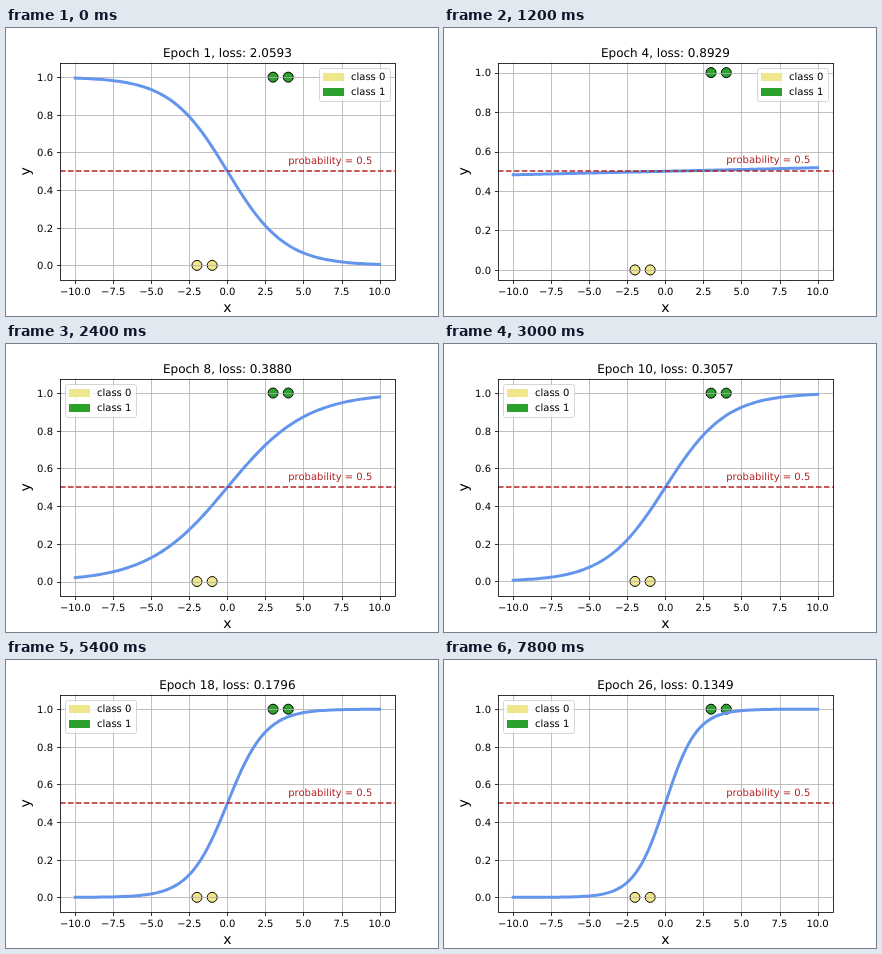
Animation, 432 px wide and 288 px high, one loop 8000 ms. Source, as an HTML page:

```html
<!DOCTYPE html>
<html lang="en">
<head>
<meta charset="utf-8">
<title>Logistic regression training</title>
<style>
  html, body { margin: 0; width: 100%; height: 100%; overflow: hidden; background: #fff; }
  svg { display: block; width: 432px; height: 288px; }
  text { font-family: "DejaVu Sans", Verdana, sans-serif; font-size: 10px; text-rendering: geometricPrecision; }
</style>
</head>
<body>
<svg id="stage" viewBox="0 0 432 288"></svg>
<script>
const LOOP = 8000, STEP = 300, RATE = 0.1, START_WEIGHT = -0.75;
const BOX = { left: 54, right: 388.8, top: 34.56, bottom: 252 };
const WIDTH = BOX.right - BOX.left, HEIGHT = BOX.bottom - BOX.top;
const RADIUS = 5, SAMPLES = 100;
const KHAKI = '#f0e68c', GREEN = '#2ca02c', RED = '#b22222';
const POINTS = [[-2, 0], [-1, 0], [3, 1], [4, 1]];

const svg = document.getElementById('stage');

function add(parent, tag, attrs = {}, content = '') {
  const el = document.createElementNS('http://www.w3.org/2000/svg', tag);
  set(el, attrs);
  el.textContent = content;
  parent.appendChild(el);
  return el;
}
function set(el, attrs) {
  for (const key in attrs) el.setAttribute(key, attrs[key]);
}

const snap = v => Math.floor(v + 0.5) + 0.5;
const sigmoid = z => 1 / (1 + Math.exp(-z));
const xPos = x => BOX.left + WIDTH * (x + 11) / 22;

// One gradient step per epoch; the loss is taken before the step.
function train(epochs) {
  const history = [];
  let w = START_WEIGHT;
  for (let i = 0; i < epochs; i++) {
    let loss = 0, grad = 0;
    for (const [x, y] of POINTS) {
      const p = sigmoid(w * x);
      loss -= Math.log(y ? p : 1 - p) / POINTS.length;
      grad += (p - y) * x / POINTS.length;
    }
    w -= RATE * grad;
    history.push({ loss, w });
  }
  return history;
}

// The y limits leave room for the markers, measured on the curve's own scale.
function yScale(w) {
  const span = Math.abs(sigmoid(10 * w) - sigmoid(-10 * w)) * 1.1;
  const extra = RADIUS * span / HEIGHT;
  const unit = HEIGHT / (1.1 * (1 + 2 * extra));
  const mid = (BOX.top + BOX.bottom) / 2;
  return y => mid - (y - 0.5) * unit;
}

const markers = POINTS.map(([x, y]) => add(svg, 'circle', {
  cx: xPos(x), r: RADIUS, fill: y ? GREEN : KHAKI, stroke: '#000', 'stroke-width': 1
}));

const grid = add(svg, 'g', { stroke: '#b0b0b0', 'stroke-width': 0.8 });
const ticks = add(svg, 'g', { stroke: '#000', 'stroke-width': 0.8 });
const labels = add(svg, 'g');

for (let x = -10; x <= 10; x += 2.5) {
  const px = snap(xPos(x));
  add(grid, 'line', { x1: px, x2: px, y1: BOX.top, y2: BOX.bottom });
  add(ticks, 'line', { x1: px, x2: px, y1: 252.5, y2: 256 });
  add(labels, 'text', { x: xPos(x), y: 267, 'text-anchor': 'middle' },
    x.toFixed(1).replace('-', '\u2212'));
}

const rows = [0, 0.2, 0.4, 0.6, 0.8, 1].map(value => ({
  value,
  line: add(grid, 'line', { x1: BOX.left, x2: BOX.right }),
  tick: add(ticks, 'line', { x1: 51, x2: 54.5 }),
  label: add(labels, 'text', { x: 47, 'text-anchor': 'end' }, value.toFixed(1))
}));

const curve = add(svg, 'polyline', {
  fill: 'none', stroke: '#6495ed', 'stroke-width': 3,
  'stroke-linecap': 'square', 'stroke-linejoin': 'round'
});
add(svg, 'line', {
  x1: BOX.left, x2: BOX.right, y1: 143, y2: 143,
  stroke: RED, 'stroke-width': 1.5, 'stroke-dasharray': '5.55 2.4'
});
add(svg, 'rect', {
  x: 54.5, y: 35.5, width: 335, height: 217,
  fill: 'none', stroke: '#000', 'stroke-width': 0.8
});
const note = add(svg, 'text', { x: xPos(4), fill: RED }, 'probability = 0.5');

add(svg, 'text', { x: 221.4, y: 284, 'text-anchor': 'middle', style: 'font-size:14px' }, 'x');
add(svg, 'text', {
  transform: 'translate(24 143.3) rotate(-90)', 'text-anchor': 'middle', style: 'font-size:14px'
}, 'y');
const title = add(svg, 'text', {
  x: 221.4, y: 29, 'text-anchor': 'middle', style: 'font-size:12px'
});

const legend = add(svg, 'g');
add(legend, 'rect', {
  x: 0.5, y: 40.5, width: 71, height: 33, rx: 2,
  fill: '#fff', stroke: '#ccc', opacity: 0.8
});
[KHAKI, GREEN].forEach((fill, i) => {
  add(legend, 'rect', { x: 4, y: 45 + 15 * i, width: 21, height: 8, fill });
  add(legend, 'text', { x: 32, y: 52 + 15 * i }, 'class ' + i);
});

const history = train(Math.floor(LOOP / STEP));
let shown = 0;

function draw(time) {
  const epoch = Math.max(1, Math.floor((time % LOOP) / STEP));
  if (epoch === shown) return;
  shown = epoch;

  const { loss, w } = history[epoch - 1];
  const yPos = yScale(w);

  title.textContent = `Epoch ${epoch}, loss: ${loss.toFixed(4)}`;
  markers.forEach((m, i) => set(m, { cy: yPos(POINTS[i][1]) }));
  for (const { value, line, tick, label } of rows) {
    const y = yPos(value), py = snap(y);
    set(line, { y1: py, y2: py });
    set(tick, { y1: py, y2: py });
    set(label, { y: Math.round(y + 3.8) });
  }
  set(note, { y: Math.round(yPos(0.54)) });

  const path = [];
  for (let i = 0; i < SAMPLES; i++) {
    const x = -10 + 20 * i / (SAMPLES - 1);
    path.push(xPos(x).toFixed(2) + ',' + yPos(sigmoid(w * x)).toFixed(2));
  }
  set(curve, { points: path.join(' ') });

  // The legend moves left once the curve would run into it.
  const blocked = yPos(sigmoid(10 * w)) < 74;
  set(legend, { transform: `translate(${blocked ? 59 : 313} 0)` });
}

const start = performance.now();
function tick() {
  draw(performance.now() - start);
  requestAnimationFrame(tick);
}
tick();
</script>
</body>
</html>
```
